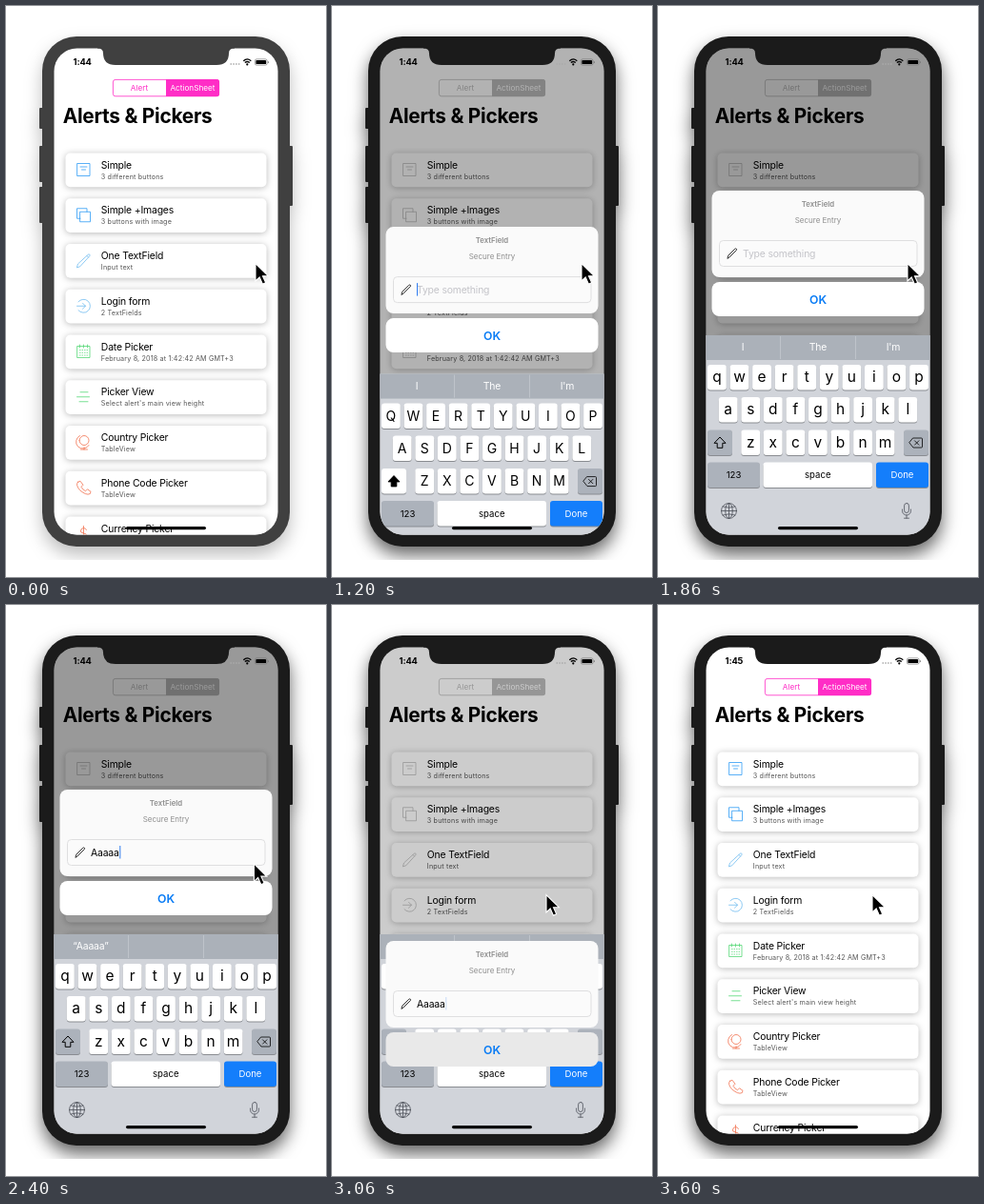
These frames come from a looping animation (336 by 600 pixels, 3.96 s). An HTML page:

```html
<!DOCTYPE html>
<html lang="en">
<head>
<meta charset="utf-8">
<title>Alerts &amp; Pickers</title>
<style>
  html, body { margin: 0; width: 100%; height: 100%; overflow: hidden; background: #fff; }
  svg { display: block; width: 336px; height: 600px; font-family: Inter, sans-serif; }
  .icon { fill: none; stroke: currentColor; stroke-width: .8; stroke-linecap: round; stroke-linejoin: round; }
  .mid { text-anchor: middle; }
  .title { font-size: 10.4px; letter-spacing: -.17px; }
  .detail { font-size: 7.2px; letter-spacing: .16px; fill: #555; }
  .card { fill: #fff; filter: drop-shadow(0 1.5px 3.5px rgba(0,0,0,.28)); }
  .key { filter: drop-shadow(0 1px 0 #898c91); }
  #tinted { color: #ff2dc6; }
  .dimmed #tinted, .dimmed .row { color: #bbb !important; }
</style>
</head>
<body>
<svg viewBox="0 0 336 600">
  <defs>
    <clipPath id="screen"><rect x="50.5" y="44.5" width="235" height="511" rx="24"/></clipPath>
    <clipPath id="stage"><rect width="336" height="582"/></clipPath>
  </defs>

  <g clip-path="url(#stage)">
    <g id="body">
      <rect x="38" y="32" width="260" height="536" rx="36"/>
      <rect x="35" y="107" width="6" height="22" rx="1"/>
      <rect x="35" y="147" width="6" height="38" rx="1"/>
      <rect x="35" y="190" width="6" height="38" rx="1"/>
      <rect x="295" y="147" width="6" height="63" rx="1"/>
    </g>
  </g>

  <g clip-path="url(#screen)">
    <g id="page">
      <rect x="50" y="44" width="236" height="512" fill="#fff"/>
      <g id="tinted" font-size="8.2" class="mid">
        <rect x="112.4" y="77.4" width="111.2" height="17.4" rx="2.5" fill="none" stroke="currentColor" stroke-width=".8"/>
        <path d="M168 77h53.5a2.5 2.5 0 0 1 2.5 2.5v13a2.5 2.5 0 0 1-2.5 2.5H168z" fill="currentColor"/>
        <text x="140" y="89" fill="currentColor">Alert</text>
        <text x="196" y="89" fill="#fff">ActionSheet</text>
      </g>
      <text x="59.7" y="122.8" font-size="20.8" font-weight="700" letter-spacing="-.25">Alerts &amp; Pickers</text>
      <g id="rows"></g>
    </g>
    <rect id="shade" x="50" y="44" width="236" height="512"/>

    <g id="keyboard">
      <rect x="50" y="346" width="236" height="220" fill="#d1d4da"/>
      <rect x="50" y="346" width="236" height="26" fill="#abb1b9"/>
      <path d="M128.5 347v24M207.5 347v24" stroke="#c3c8ce" stroke-width=".8"/>
      <g id="hints" class="mid title" fill="#fff">
        <text x="89" y="362"/><text x="168" y="362"/><text x="247" y="362"/>
      </g>
      <g id="keys"></g>
      <path id="shift" d="M65 453l6 6.3h-3.2v5h-5.6v-5H59z" stroke="#000" stroke-linejoin="round"/>
      <path class="icon" d="M268 454h8.5a1 1 0 0 1 1 1v8a1 1 0 0 1-1 1H268l-4-5zM269.5 456.8l4.4 4.4m0-4.4l-4.4 4.4"/>
      <g class="icon" color="#4c5058">
        <circle cx="74.5" cy="530.5" r="8"/><ellipse cx="74.5" cy="530.5" rx="3.8" ry="8"/>
        <path d="M66.5 530.5h16M74.5 522.5v16M68 526q6.5 2.5 13 0M68 535q6.5-2.5 13 0"/>
        <rect x="258.6" y="522.5" width="4.8" height="10" rx="2.4"/>
        <path d="M256.5 529v1.5a4.5 4.5 0 0 0 9 0V529M261 535v3.2M258.5 538.2h5"/>
      </g>
    </g>

    <g id="alert">
      <rect x="56.5" y="194" width="223" height="91" rx="8" fill="#fafafa"/>
      <g class="mid" fill="#8e8e8e">
        <text x="168" y="210.8" font-size="7.8" font-weight="600">TextField</text>
        <text x="168" y="228.3" font-size="8">Secure Entry</text>
      </g>
      <rect x="64.5" y="246.5" width="207.5" height="27" rx="4" fill="#fbfbfb" stroke="#d8d8da" stroke-width=".8"/>
      <path class="icon" d="M73 265l.8-2.8 7-7q.8-.6 1.5 0t0 1.5l-7 7z"/>
      <text id="entry" class="title" x="89" y="263.5"/>
      <rect id="caret" y="253" width="1" height="13.5" fill="#2f7cf0"/>
      <rect id="ok" x="56.5" y="290" width="223" height="36" rx="8"/>
      <text class="mid" x="168" y="312.5" font-size="12.3" font-weight="600" fill="#087bf5">OK</text>
    </g>

    <rect x="126" y="547" width="84" height="3.2" rx="1.6"/>
    <text id="clock" x="70.5" y="62" font-size="9.3" font-weight="700" letter-spacing="-.1"/>
    <path d="M235.5 61h10" stroke="#aaa" stroke-width="1.5" stroke-dasharray="1.5 1.3"/>
    <path d="M249.3 57.8q4-4 8 0M250.8 59.6q2.5-2.3 5 0" fill="none" stroke="#000" stroke-width="1.3"/>
    <circle cx="253.3" cy="61.4" r="1.1"/>
    <rect x="261.4" y="55.9" width="12.7" height="6.2" rx="1.7" fill="none" stroke="#777" stroke-width=".7"/>
    <rect x="262.4" y="56.9" width="10.7" height="4.2" rx=".9"/>
    <path d="M275 58v2.2q1-.3 1-1.1t-1-1.1" fill="#777"/>
  </g>
  <path id="notch" d="M96 43v1.5q6 0 6 5 0 12.500 13 12.500h106q13 0 13-12.500 0-5 6-5V43z"/>
  <path id="pointer" d="M0 0v18.5l4.2-4 3.2 7.3 3.3-1.5-3.2-7.1h5.8z" stroke="#fff" stroke-width="1.1"/>
</svg>

<script>
const LOOP = 3960, TICK = 60;
const $ = id => document.getElementById(id);
const clamp = x => Math.min(1, Math.max(0, x));
const shiftY = (id, y) => $(id).setAttribute('transform', `translate(0 ${y.toFixed(2)})`);

// Icons are drawn around their own centre.
const BLUE = '#309cf5', SKY = '#72bdf0', GREEN = '#57d978', CORAL = '#f17250';
const rows = [
  ['Simple', '3 different buttons', BLUE, 'M-6.5-6.5h13v13h-13zM-3.5-3h7M-2 0h4'],
  ['Simple +Images', '3 buttons with image', BLUE, 'M-3.5-3.5H7V7H-3.5zM-3.5 3.5H-7V-7H3.5v3.5'],
  ['One TextField', 'Input text', SKY, 'M-7 7l1-3.500L4.800-6.300q.8-.7 1.500 0t0 1.500L-3.500 6zM3.500-5l1.500 1.500'],
  ['Login form', '2 TextFields', SKY, 'M-5.5-4.5a7 7 0 1 1 0 9M-7 0h9M-1-3l3 3-3 3'],
  ['Date Picker', 'February 8, 2018 at 1:42:42 AM GMT+3', GREEN,
    'M-6.5-5.5h13v12h-13zM-4-7v3M0-7v3M4-7v3' +
    [-1.5, 1.3, 4].map(y => [-4, -1.5, 1, 3.5].map(x => `M${x} ${y}h.6`).join('')).join('')],
  ['Picker View', "Select alert's main view height", GREEN, 'M-3.5-5h8M-7 0h13M-4.5 5h9'],
  ['Country Picker', 'TableView', CORAL,
    'M-4.5-2a5 5 0 1 0 10 0a5 5 0 1 0-10 0M-4-7a7.2 7.2 0 1 0 9.500 10M.5 5.200v2.300M-3 7.500h7'],
  ['Phone Code Picker', 'TableView', CORAL,
    'M-6-6l2.5-1 3 4-2 2q1.5 3 4.5 4.5l2-2 3.5 2.5-.7 2.3q-2 1.2-5 0Q-5.5 3-7-3q0-2 1-3z'],
  ['Currency Picker', 'TableView', CORAL, 'M3-3.5q-1-2-3-2t-3 2.5 3 3 3 3-3 2.5-3-2M0-7.5v15'],
];
$('rows').innerHTML = rows.map(([title, detail, color, path], i) => `
  <g transform="translate(0 ${154.5 + 47.75 * i})">
    <rect class="card" x="62.5" width="211" height="35.8" rx="5"/>
    <path class="icon row" style="color:${color}" transform="translate(81.5 17.5)" d="${path}"/>
    <text class="title" x="99.8" y="16.2">${title}</text>
    <text class="detail" x="99.8" y="27">${detail}</text>
  </g>`).join('');

const SMALL = 'font-size="9.6"';
const key = (x, y, w, fill, label = '', attrs = '') => `
  <rect class="key" x="${x}" y="${y}" width="${w}" height="26.5" rx="3" fill="${fill}"/>
  <text x="${x + w / 2}" y="${y + 16.6}" text-anchor="middle" ${attrs}>${label}</text>`;
const letterRow = (letters, x, y) => [...letters].map((c, i) =>
  key(x + 23.57 * i, y, 19.8, '#fff', c, 'class="letter" dy="1.4"')).join('');
$('keys').innerHTML =
  letterRow('qwertyuiop', 52, 377) + letterRow('asdfghjkl', 63.8, 411) + letterRow('zxcvbnm', 87.3, 445.5) +
  key(52, 445.5, 26, '#acb2bb') + key(258, 445.5, 26, '#acb2bb') +
  key(52, 479.5, 55, '#acb2bb', '123', SMALL) +
  key(110.5, 479.5, 114.5, '#fff', 'space', SMALL) +
  key(229, 479.5, 55, '#147efb', 'Done', SMALL + ' fill="#fff"');
const letters = [...document.querySelectorAll('.letter')];
const shiftKey = document.querySelectorAll('.key')[letters.length];

// The opening moves in a few uneven steps.
const OPENING = [1080, 1200, 1320, 1500, 1620];

function layout(t) {
  if (t < 1080) return { alert: 362, keyboard: 210, dim: 0 };
  if (t < 3060) {
    const at = OPENING.filter(s => s <= t).pop(), age = at - 1080;
    const settled = at === 1620;
    return {
      alert: settled ? 0 : 362 * Math.exp(-age / 53.3),
      keyboard: settled ? 0 : 210 * Math.exp(-age / 73),
      dim: .4 * clamp((at - 1020) / 240),
    };
  }
  const leave = clamp((t - 3300) / 300);
  return {
    alert: t < 3180 ? 159 : 362,
    keyboard: 210 * (1 - (1 - leave) ** 2),
    dim: t < 3180 ? .2 : t < 3360 ? .02 : 0,
  };
}

function render(time) {
  const t = Math.floor(time % LOOP / TICK) * TICK;
  const { alert, keyboard, dim } = layout(t);

  const shell = t < 900 ? '#404040' : '#1b1b1b';
  $('body').setAttribute('fill', shell);
  $('notch').setAttribute('fill', shell);
  $('body').style.filter = `drop-shadow(0 9px 9px rgba(0,0,0,${t < 900 ? .25 : .6}))`;

  shiftY('alert', alert);
  shiftY('keyboard', keyboard);
  $('shade').setAttribute('opacity', dim);
  $('page').setAttribute('class', dim > .05 ? 'dimmed' : '');
  $('clock').textContent = t < 3360 ? '1:44' : '1:45';

  const upper = t < 1860;
  for (const el of letters) {
    el.textContent = upper ? el.textContent.toUpperCase() : el.textContent.toLowerCase();
    el.style.fontSize = upper ? '14px' : '15.5px';
  }
  shiftKey.setAttribute('fill', upper ? '#fff' : '#acb2bb');
  $('shift').setAttribute('fill', upper ? '#000' : 'none');

  const typed = 'Aaaaa'.slice(0, Math.max(0, Math.floor((t - 1920) / 120) + 1));
  $('entry').textContent = typed || 'Type something';
  $('entry').setAttribute('fill', typed ? '#000' : '#c4c4c9');
  const hints = typed ? [`“${typed}”`, '', ''] : ['I', 'The', "I'm"];
  [...$('hints').children].forEach((el, i) => { el.textContent = hints[i]; });
  $('caret').setAttribute('x', typed ? 96.5 + 5.7 * (typed.length - 1) : 89);
  $('caret').setAttribute('opacity', t >= 1620 && t < 1920 ? 0 : t >= 2820 ? .25 : 1);
  $('ok').setAttribute('fill', t >= 2880 && t < 3180 ? '#e9e9e9' : '#fff');

  const p = clamp((t - 2340) / 480), glide = p * p * (3 - 2 * p);
  $('pointer').setAttribute('transform', `translate(${262 - 37 * glide} ${270.5 + 34 * glide})`);
}

let start;
function frame(now) {
  start ??= now;
  render(now - start);
  requestAnimationFrame(frame);
}
render(0);
requestAnimationFrame(frame);
</script>
</body>
</html>
```
